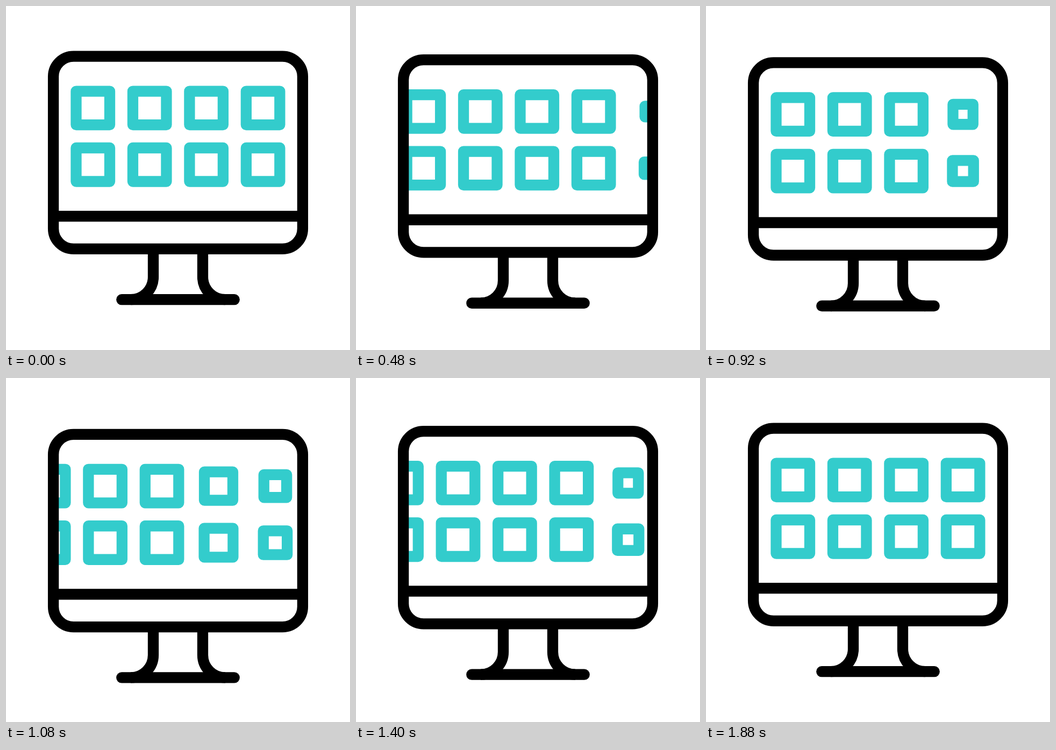
Write an HTML page that moves like this. It is 640 px wide and 640 px high and loops after 2000 ms.

```html
<!DOCTYPE html>
<html lang="en">
<head>
<meta charset="utf-8">
<title>Scrolling tiles on a monitor</title>
<style>
  html, body { margin: 0; width: 100%; height: 100%; overflow: hidden; background: #fff; }
  svg { display: block; width: 100vw; height: 100vh; }
</style>
</head>
<body>
<svg viewBox="0 0 640 640">
  <defs>
    <clipPath id="screen"><rect x="98" y="100" width="444" height="285"/></clipPath>
  </defs>
  <g id="monitor" fill="none" stroke-width="20.3">
    <g clip-path="url(#screen)">
      <g id="tiles" stroke="#33cccc" stroke-linejoin="round"></g>
    </g>
    <g stroke="#000">
      <path d="M274 452V504A42 42 0 0 1 232 546.2M366 452V504A42 42 0 0 0 408 546.2"/>
      <path d="M215.3 546.2H424.7" stroke-linecap="round"/>
      <rect x="88.1" y="93.6" width="463.8" height="358.2" rx="37.5"/>
      <path d="M90 391.2H550"/>
    </g>
  </g>
</svg>
<script>
const LOOP = 2000, STEP = 40;
const PITCH = 105.45, SIDE = 62.5, FIRST_X = 161.75, FIRST_Y = 189.8;
const COLS = 8, VISIBLE = 4, MID = 920;
const BOB = 11.8, BOB_HALF = 930;
// start and end of growth for each incoming column
const GROWTH = [[200, 941], [440, 1290], [650, 1342], [911, 1764]];

const clamp = v => Math.min(1, Math.max(0, v));
const smooth = v => v * v * (3 - 2 * v);

// symmetric cubic-bezier(a, 0, 1 - a, 1)
function ease(a, v) {
  const x = clamp(v);
  let lo = 0, hi = 1;
  for (let i = 0; i < 24; i++) {
    const s = (lo + hi) / 2, r = 1 - s;
    const bx = 3 * r * r * s * a + 3 * r * s * s * (1 - a) + s * s * s;
    if (bx < x) lo = s; else hi = s;
  }
  return smooth((lo + hi) / 2);
}

const monitor = document.getElementById("monitor");
const group = document.getElementById("tiles");
const tiles = [];
for (let row = 0; row < 2; row++) {
  for (let col = 0; col < COLS; col++) {
    const el = document.createElementNS("http://www.w3.org/2000/svg", "rect");
    group.append(el);
    tiles.push({ el, row, col });
  }
}

function sideAt({ row, col }, t) {
  if (col < VISIBLE) return SIDE;
  const [from, end] = GROWTH[col - VISIBLE];
  const start = from - row * 45;
  return Math.max(0.01, SIDE * smooth(clamp((t - start) / (end - start))));
}

function draw(t) {
  const dy = BOB * (1 - ease(0.5, Math.abs(t - MID) / BOB_HALF));
  const shift = VISIBLE * PITCH * ease(0.54, (t - 80) / 1680);
  monitor.setAttribute("transform", `translate(0 ${dy.toFixed(3)})`);
  group.setAttribute("transform", `translate(${(-shift).toFixed(3)} 0)`);
  for (const tile of tiles) {
    const side = sideAt(tile, t);
    tile.el.setAttribute("x", FIRST_X + tile.col * PITCH - side / 2);
    tile.el.setAttribute("y", FIRST_Y + tile.row * PITCH - side / 2);
    tile.el.setAttribute("width", side);
    tile.el.setAttribute("height", side);
  }
}

const begin = performance.now();
function tick() {
  const t = (performance.now() - begin) % LOOP;
  draw(Math.floor(t / STEP) * STEP);
  requestAnimationFrame(tick);
}
tick();
</script>
</body>
</html>
```
